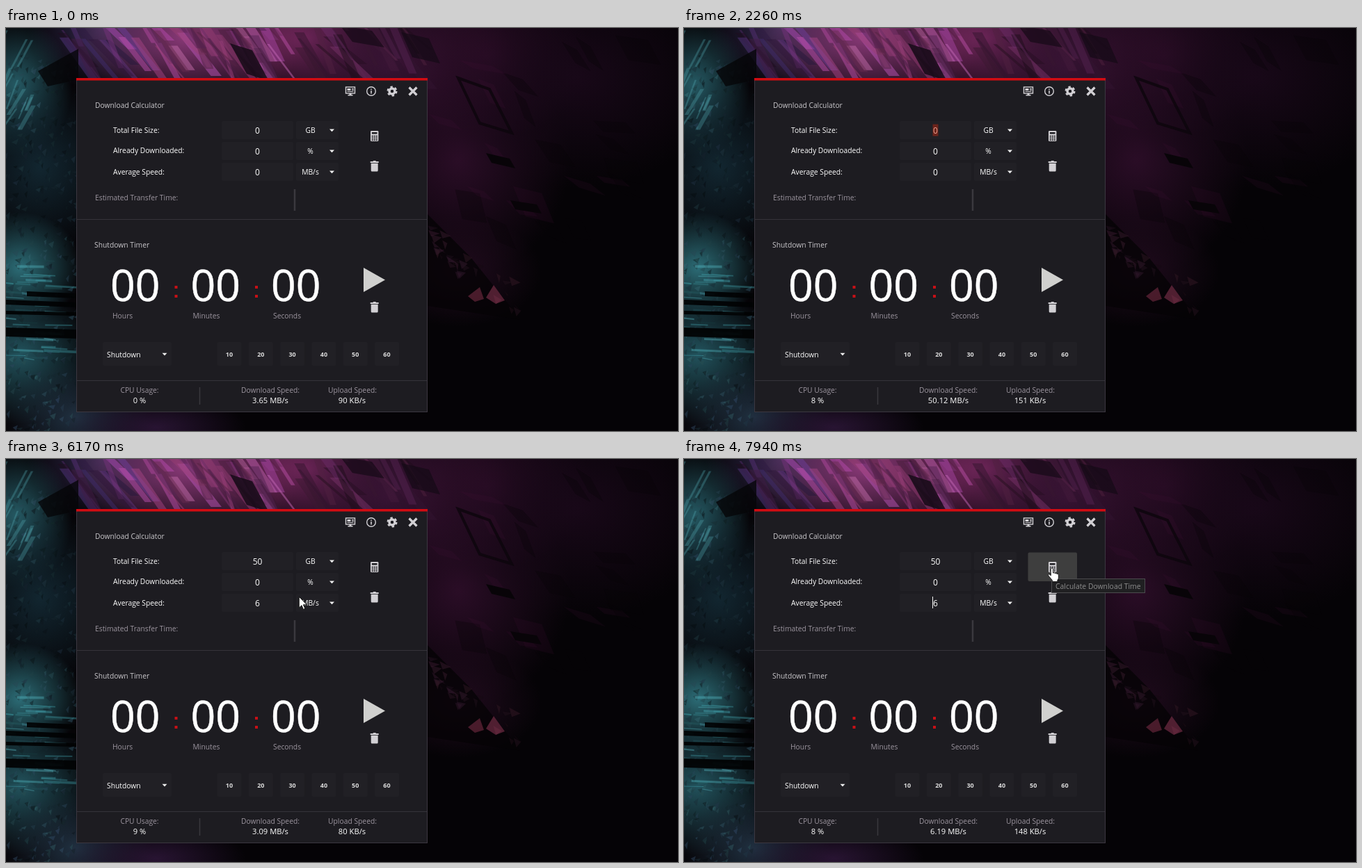
Animation of 966 by 580 pixels, one loop 8000 ms. Source, as an HTML page with a canvas:

```html
<!DOCTYPE html>
<html lang="en">
<head>
<meta charset="utf-8">
<title>Download calculator</title>
<style>
  html, body { margin: 0; width: 100%; height: 100%; overflow: hidden; background: #050306; }
  canvas, svg { position: absolute; left: 0; top: 0; }
  text { font: 500 10.3px "Open Sans", "Noto Sans", sans-serif; fill: #fff; }
  .mid { text-anchor: middle; }
  .head { fill: #cac8cc; }
  .dim { fill: #9c959f; }
  .num { font-size: 12px; text-anchor: middle; }
  .stat { font-size: 11.2px; text-anchor: middle; }
  .big { font-size: 62.5px; font-weight: 400; text-anchor: middle; stroke: #fff; stroke-width: .5; }
  .preset { font-size: 9px; font-weight: 700; text-anchor: middle; fill: #dcdcdc; }
  .tip { font-size: 10.4px; fill: #8d8d8d; }
  .icon { fill: #d2d0d4; }
  .line { fill: none; stroke: #d2d0d4; stroke-width: 1.4; }
</style>
</head>
<body>
<canvas id="wall" width="966" height="580"></canvas>
<svg id="stage" width="966" height="580" viewBox="0 0 966 580">
  <defs>
    <g id="trash" class="icon"><path d="M-6 -7h3.500l1 -1h3l1 1h3.500v2h-12zM-5 -4.200h10v10.200q0 1.500 -1.500 1.500h-7q-1.500 0 -1.500 -1.500z"/></g>
    <path id="drop" d="M-3.500 -1.800h7l-3.500 3.700z" fill="#f0f0f0"/>
  </defs>
  <rect x="101.500" y="72.500" width="504" height="480" fill="#1d1c21" stroke="#3b3740"/>
  <path d="M101 73.700h505" stroke="#d20c12" stroke-width="3.400"/>
  <path d="M102 275.500h503M102 507.500h503" stroke="#35333a"/>
  <path d="M415 232v31" stroke="#3a383e" stroke-width="2.500"/>
  <path d="M278.500 517v25" stroke="#3a383e" stroke-width="1.500"/>
  <g id="fields" fill="#212025"></g>
  <rect id="hover" x="494.500" y="134.500" width="70.500" height="41.500" rx="2" fill="#3e3e3e"/>

  <g transform="translate(495 91)">
    <rect class="line" x="-6.500" y="-6" width="13" height="9"/>
    <path class="icon" d="M-4.500 -4h5v3h-5zM2 -4h3v1.200h-3zM2 -2h3v1h-3zM-4.500 0h9v1h-9zM-1.500 3h3v2h2v1.500h-7v-1.500h2z"/>
  </g>
  <g transform="translate(525 91)">
    <circle class="line" r="6.300"/><path class="icon" d="M-.8 -3.500h1.600v1.600h-1.600zM-.8 -1h1.600v4.500h-1.600z"/>
  </g>
  <g transform="translate(555 91)" fill="none" stroke="#d2d0d4">
    <circle r="4" stroke-width="3.400"/><circle r="6.300" stroke-width="2.400" stroke-dasharray="3.300 3.300"/>
  </g>
  <path d="M579.500 85.500l11 11m0 -11l-11 11" stroke="#d2d0d4" stroke-width="3.200"/>

  <g transform="translate(529.700 155.500)">
    <rect class="icon" x="-5.700" y="-7.500" width="11.400" height="15" rx="1.300"/>
    <path d="M-3.800 -5.500h7.600v2.500h-7.600z" fill="#1d1c21"/>
    <path d="M-4 .1h8M-4 2.900h8M-4 5.600h8" stroke="#1d1c21" stroke-width="1.600" stroke-dasharray="2 1"/>
  </g>
  <use href="#trash" x="529.700" y="199"/>
  <use href="#trash" x="529.700" y="402"/>
  <path d="M514 345l31 17.500l-31 17.500z" fill="#d0d0ce"/>
  <path d="M242.500 371h4v4h-4zm0 13h4v4h-4zM358 371h4v4h-4zm0 13h4v4h-4z" fill="#c81016"/>

  <g id="labels"></g>
  <rect id="mark" x="357.500" width="8" height="17" fill="#6c231b"/>
  <text id="size" class="num" x="361.500" y="151.500"></text>
  <text id="done" class="num" x="361.500" y="181.500">0</text>
  <text id="speed" class="num" x="361.500" y="211.500"></text>
  <rect id="caret" width="1" height="17" fill="#f4f4f4"/>
  <text id="cpu" class="stat" x="192" y="540"></text>
  <text id="down" class="stat" x="380" y="540"></text>
  <text id="up" class="stat" x="497.500" y="540"></text>

  <g id="tooltip">
    <rect x="528.500" y="172.500" width="134" height="20" fill="#202022" stroke="#4c4b4e"/>
    <text class="tip" x="534" y="187">Calculate Download Time</text>
  </g>
  <circle id="click" r="11" fill="#b5a816" fill-opacity=".9"/>
  <g id="pointer">
    <path id="beam" d="M-3.500 -6.500h2.500l1 1l1 -1h2.500M0 -5.500v11M-3.500 6.500h2.500l1 -1l1 1h2.500" fill="none" stroke="#eee" stroke-width="1.100"/>
    <path id="arrow" d="M0 0v16l3.700 -3.500l2.500 5.700l2.500 -1l-2.500 -5.600h5z" fill="#fff" stroke="#111"/>
    <path id="hand" d="M-1.700 1q1.700 -2.200 3.200 0v6q2 -1 2.800 .5q1.800 -.8 2.600 .8q2.400 -.6 2.500 1.500v4q0 2 -1.500 3.500v2.200h-7.500v-2l-5.500 -6.500q-1 -2.200 1 -2.300l2.400 2z" fill="#fff" stroke="#111" stroke-width=".9"/>
  </g>
</svg>
<script>
const $ = id => document.getElementById(id);

// Wallpaper: soft glows with seeded facets and slanted blocks
const c = $('wall').getContext('2d');
let seed = 11;
const rand = (a = 0, b = 1) => {
  seed = (seed * 16807) % 2147483647;
  return a + (b - a) * seed / 2147483647;
};
function glow(x, y, rx, ry, color) {
  c.save();
  c.translate(x, y);
  c.scale(rx, ry);
  const g = c.createRadialGradient(0, 0, 0, 0, 0, 1);
  g.addColorStop(0, `rgba(${color},1)`);
  g.addColorStop(.5, `rgba(${color},.5)`);
  g.addColorStop(1, `rgba(${color},0)`);
  c.fillStyle = g;
  c.fillRect(-1, -1, 2, 2);
  c.restore();
}
function poly(color, ...p) {
  c.fillStyle = color;
  c.beginPath();
  for (let i = 0; i < p.length; i += 2) c.lineTo(p[i], p[i + 1]);
  c.fill();
}
const slab = (color, x, y, w, h, dx, dy = 0) =>
  poly(color, x, y, x + w, y + dy, x + w + dx, y + h + dy, x + dx, y + h);

function paintWall() {
  c.fillStyle = '#050306';
  c.fillRect(0, 0, 966, 580);
  glow(140, 0, 110, 90, '50,42,78');
  glow(260, 10, 170, 110, '140,58,122');
  glow(430, 15, 150, 100, '118,40,94');
  glow(560, 50, 170, 130, '58,20,54');
  glow(690, 40, 150, 120, '48,14,42');
  glow(650, 190, 160, 170, '42,13,38');
  glow(820, 70, 210, 160, '24,8,24');
  glow(650, 350, 120, 80, '32,11,29');
  glow(15, 85, 80, 100, '38,92,102');
  glow(50, 200, 120, 130, '18,38,48');
  glow(20, 345, 90, 80, '44,108,118');
  glow(20, 470, 110, 100, '34,82,92');
  glow(100, 560, 110, 80, '32,48,64');
  glow(215, 575, 130, 50, '40,20,50');

  // Streaks along the top
  for (let i = 0; i < 80; i++) {
    const x = rand(100, 600), mid = x > 150 && x < 420;
    const light = mid ? rand(10, 60) : rand(6, 34);
    const hue = x < 190 ? rand(255, 300) : rand(302, 325);
    slab(`hsla(${hue},42%,${light}%,.5)`, x - 30, rand(-40, 30), rand(3, 16), rand(35, 85), rand(25, 60));
  }
  slab('#160b18dd', 322, 22, 32, 44, 24, 10);
  slab('#1a0b1acc', 480, -4, 46, 24, 18, 8);
  slab('#150a17bb', 568, 6, 40, 36, 16, 9);

  // Rock and water light on the left
  for (let i = 0; i < 420; i++) {
    const x = rand(-10, 100), y = rand(40, 580), s = rand(3, 10);
    const lit = y > 300 ? 34 : y < 150 && x < 50 ? 38 : 22;
    poly(`hsla(${rand(184, 215)},35%,${rand(3, lit)}%,.4)`, x, y, x + s, y - rand(1, 6), x + s * .7, y + rand(2, 7));
  }
  for (let i = 0; i < 14; i++) slab('#52a6ae55', rand(-12, 40), rand(0, 120), rand(2, 7), rand(18, 45), rand(-24, -8));
  poly('#050608cc', 46, 62, 104, 30, 104, 74, 60, 84);
  for (let i = 0; i < 40; i++) slab(`hsla(186,45%,${rand(18, 55)}%,.4)`, rand(-20, 60), rand(330, 480), rand(12, 50), rand(1, 4), 0, rand(0, 3));
  slab('#020304ee', 30, 379, 71, 7, 0, 3);
  slab('#020304ee', 0, 391, 101, 7, 0, 4);
  slab('#020304ee', 0, 407, 101, 5, 0, 2);
  slab('#020304ee', 0, 431, 101, 13, 0, 3);

  // Slanted blocks on the right
  for (let i = 0; i < 26; i++) {
    const x = rand(600, 880), y = rand(0, 290);
    slab(i % 3 ? '#08030855' : '#4a143c22', x, y, rand(12, 48), rand(8, 45), rand(8, 24), rand(2, 14));
  }
  c.strokeStyle = '#0c050ccc';
  c.lineWidth = 4;
  c.beginPath();
  for (const [x, y] of [[650, 72], [695, 88], [727, 151], [681, 137]]) c.lineTo(x, y);
  c.closePath();
  c.stroke();
  slab('#080408', 690, 180, 34, 14, 8, 8);
  slab('#080408', 725, 248, 38, 13, 7, 6);
  poly('#050306cc', 606, 268, 668, 330, 740, 420, 606, 400);
  for (let i = 0; i < 32; i++) {
    const x = rand(606, 735), y = 300 + (x - 606) * .65 + rand(-22, 25);
    poly(`hsla(${rand(305, 335)},35%,${rand(6, 17)}%,.5)`, x, y, x + rand(5, 18), y + rand(2, 10), x + 4, y + rand(6, 15));
  }
  poly('#93385377', 664, 386, 681, 373, 687, 390, 674, 394);
  poly('#a6416277', 690, 388, 701, 370, 717, 392, 704, 397);
}

// Fixed parts of the panel
function label(str, x, y, cls = '') {
  $('labels').insertAdjacentHTML('beforeend', `<text x="${x}" y="${y}" class="${cls}">${str}</text>`);
}
function box(x, y, w, h) {
  $('fields').insertAdjacentHTML('beforeend', `<rect x="${x}" y="${y}" width="${w}" height="${h}" rx="2"/>`);
}
function drop(x, y) {
  $('labels').insertAdjacentHTML('beforeend', `<use href="#drop" x="${x}" y="${y}"/>`);
}
function buildPanel() {
  label('Download Calculator', 128, 114.5, 'head');
  label('Estimated Transfer Time:', 128, 248, 'dim');
  label('Shutdown Timer', 127, 316, 'head');
  [['Total File Size:', 'GB', 150.5], ['Already Downloaded:', '%', 180], ['Average Speed:', 'MB/s', 211]].forEach(([name, unit, y], i) => {
    const top = 134 + i * 30;
    box(310, top, 103, 26);
    box(417, top, 61, 26);
    label(name, 154, y);
    label(unit, 437.5, top + 17.2, 'mid');
    drop(468.5, top + 13.3);
  });
  ['Hours', 'Minutes', 'Seconds'].forEach((name, i) => {
    const x = 153 + i * 115.5;
    label('00', x + 32.7, 392.5, 'big');
    label(name, x, 417.5, 'dim');
  });
  box(139, 452, 99, 34);
  label('Shutdown', 145, 473.7);
  drop(228, 469.5);
  for (let i = 0; i < 6; i++) {
    const x = 321 + i * 45.3;
    box(x - 17.5, 452, 35, 34);
    label((i + 1) * 10, x, 473, 'preset');
  }
  label('CPU Usage:', 192, 524.5, 'mid dim');
  label('Download Speed:', 380, 524.5, 'mid dim');
  label('Upload Speed:', 498, 524.5, 'mid dim');
}

// Timelines: [time, values...]
const path = [[440, 596, -14], [560, 589, 60], [900, 380, 152], [3070, 380, 152], [3110, 386, 152], [3300, 386, 152],
  [3640, 369, 202], [3700, 369, 202], [4090, 387, 210], [4190, 387, 210], [4350, 388.5, 211], [5930, 388.5, 211],
  [6250, 432, 194], [6590, 503, 165], [6730, 528, 158], [6850, 529, 157]];
const stats = [[0, 0, '3.65', 90], [580, 1, '6.16', 968], [1580, 8, '50.12', 151], [2580, 8, '6.02', 152],
  [3580, 8, '5.13', 147], [4660, 10, '5.63', 139], [5600, 9, '3.09', 80], [6750, 8, '6.19', 148]];
const sizes = [[0, '0'], [2280, '5'], [2530, '50']];
const speeds = [[0, '0'], [5000, '5'], [5560, '0'], [5720, '6']];

const last = (list, t) => list.filter(k => k[0] <= t).pop();
const within = (t, ...spans) => spans.some(([a, b]) => t >= a && t < b);
const ramp = (t, a, b) => Math.min(1, Math.max(0, (t - a) / (b - a)));
const show = (id, on) => $(id).setAttribute('opacity', +on);

function position(t) {
  const a = last(path, t) || path[0], b = path[path.indexOf(a) + 1] || a;
  const p = a === b ? 0 : ramp(t, a[0], b[0]);
  return [a[1] + (b[1] - a[1]) * p, a[2] + (b[2] - a[2]) * p];
}

function draw(t) {
  const [, cpu, down, up] = last(stats, t);
  $('cpu').textContent = cpu + ' %';
  $('down').textContent = down + ' MB/s';
  $('up').textContent = up + ' KB/s';
  $('size').textContent = last(sizes, t)[1];
  $('speed').textContent = last(speeds, t)[1];

  const sizeMarked = within(t, [1390, 2280]), speedMarked = within(t, [3740, 4690]);
  show('mark', sizeMarked || speedMarked);
  $('mark').setAttribute('y', sizeMarked ? 138.5 : 198.5);
  $('size').style.fill = sizeMarked ? '#eca08f' : '';
  $('speed').style.fill = speedMarked ? '#eca08f' : '';

  const first = t < 3740;
  show('caret', within(t, [2280, 3070], [3600, 3740], [5220, 5950], [6480, 7010], [7540, 8000]));
  $('caret').setAttribute('x', !first ? 357 : t < 2530 ? 365 : 368);
  $('caret').setAttribute('y', first ? 138 : 198);

  const [x, y] = position(t);
  const field = x > 310 && x < 413 && y > 134 && y < 220;
  const button = x > 494 && x < 565 && y > 134 && y < 176;
  show('pointer', within(t, [440, 2260], [3080, 4690], [5000, 5080], [5930, 8000]));
  $('pointer').setAttribute('transform', `translate(${x} ${y})`);
  show('beam', field);
  show('hand', button);
  show('arrow', !field && !button);
  show('click', within(t, [1370, 1390], [3640, 3680]));
  $('click').setAttribute('cx', x - 2);
  $('click').setAttribute('cy', y);

  show('hover', ramp(t, 6600, 6730));
  show('tooltip', ramp(t, 7800, 7940));
}

paintWall();
buildPanel();
(function loop() {
  draw(performance.now() % 8000);
  requestAnimationFrame(loop);
})();
</script>
</body>
</html>
```
